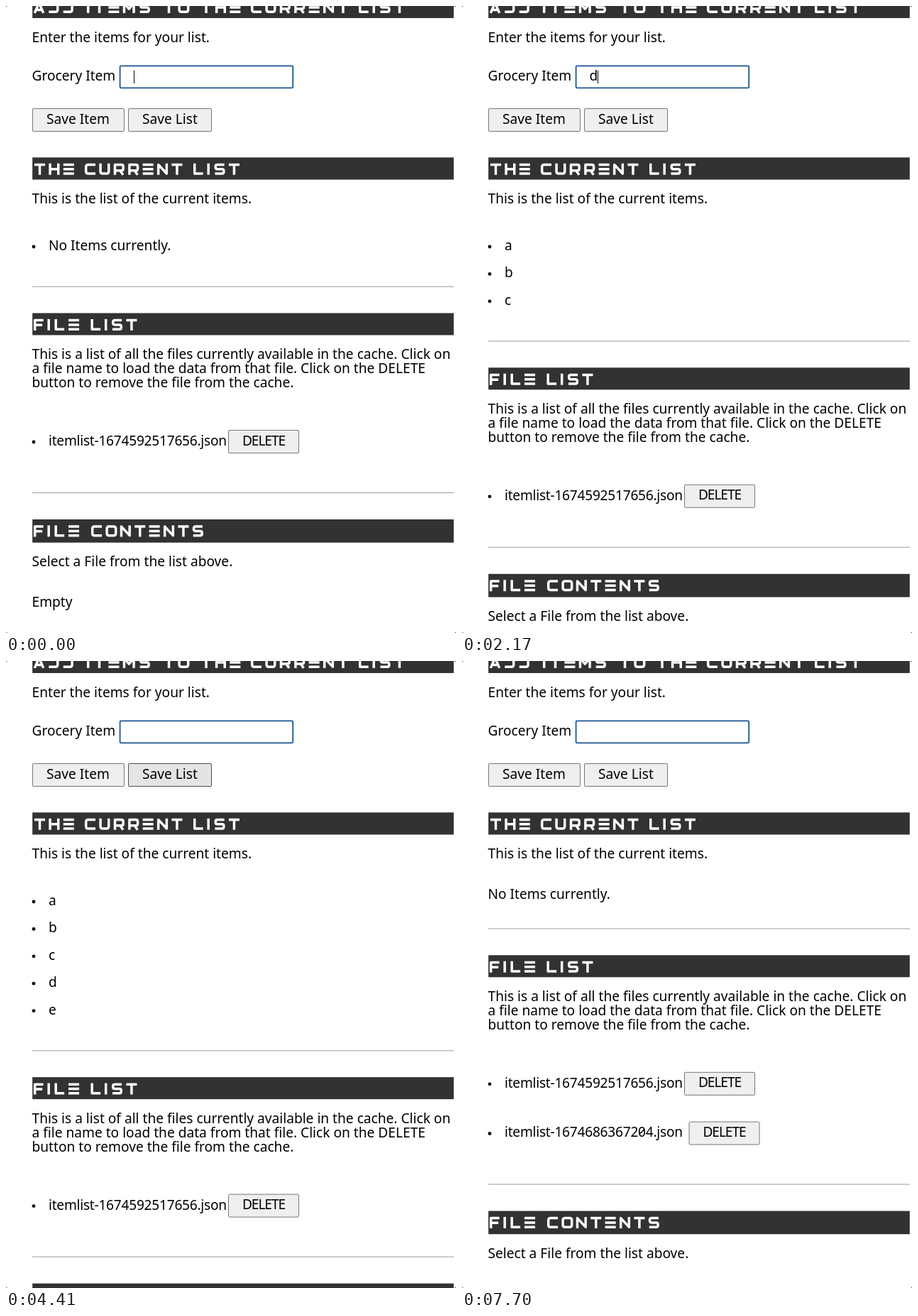
An HTML page for the animation above (8 s loop, 634 by 883 pixels).

```html
<!DOCTYPE html>
<html lang="en">
<head>
<meta charset="utf-8">
<title>Grocery list</title>
<style>
html, body { margin: 0; width: 100%; height: 100%; overflow: hidden; background: #fff; }
svg { display: block; width: 634px; height: 883px; }
text { font: 19.15px "Noto Sans", "Open Sans", sans-serif; fill: #000; white-space: pre; }
.file { letter-spacing: -.25px; font-variant-numeric: slashed-zero; }
.caps { letter-spacing: -1.1px; }
.bar { fill: #323232; }
.lettering { fill: none; stroke: #fff; stroke-width: 3.7; stroke-linejoin: round; }
.rule { fill: #9c9c9c; }
.button { fill: #efefef; stroke: #767676; }
.button.hover { fill: #e4e4e4; stroke: #4f4f4f; }
.button.active { fill: #f5f5f5; stroke: #8d8d8d; }
.input { fill: #fff; stroke: #767676; }
.input.hover { stroke: #4f4f4f; }
.input.focus { stroke: #185592; stroke-width: 1.8; }
</style>
</head>
<body>
<svg id="stage" viewBox="0 0 634 883"></svg>
<script>
const LOOP = 8000, ITEM_STEP = 38.4, FILE_STEP = 69.7, EMPTY_SHIFT = -18.2;
const stage = document.getElementById('stage');

function add(parent, tag, attrs, content) {
  const el = document.createElementNS('http://www.w3.org/2000/svg', tag);
  for (const key in attrs) el.setAttribute(key, attrs[key]);
  if (content) el.textContent = content;
  parent.append(el);
  return el;
}
const group = parent => add(parent, 'g', {});
const label = (parent, x, y, text, cls = '') => add(parent, 'text', { x, y, class: cls }, text);
const box = (parent, x, y, width, height, cls, rx = 0) =>
  add(parent, 'rect', { x, y, width, height, rx, class: cls });
const shift = (el, y) => el.setAttribute('transform', `translate(0 ${y})`);
const show = (el, on) => el.setAttribute('visibility', on ? 'visible' : 'hidden');
const rule = (parent, y) => box(parent, 37, y, 594, 1, 'rule');

// Display lettering: open strokes in a cell 16 wide and 17 high.
const glyphs = {
  A: 'M1.4 17L8 1.8L14.6 17M4 12.4H12',
  C: 'M16 1.8H5Q1.8 1.8 1.8 5V12Q1.8 15.2 5 15.2H16',
  D: 'M1 1.8H11Q14.2 1.8 14.2 5V12Q14.2 15.2 11 15.2H1',
  E: 'M0 1.8H16M0 8.5H16M0 15.2H16',
  F: 'M14.5 1.8H1.8V17M1.8 9H13',
  H: 'M1.8 0V17M14.2 0V17M1.8 8.5H14.2',
  I: 'M1.8 0V17',
  L: 'M1.8 0V15.2H14.5',
  M: 'M1.8 17V1.8L9 11L16.2 1.8V17',
  N: 'M1.8 17V1.8L14.2 15.2V0',
  O: 'M5 1.8H12Q15.2 1.8 15.2 5V12Q15.2 15.2 12 15.2H5Q1.8 15.2 1.8 12V5Q1.8 1.8 5 1.8Z',
  R: 'M1.8 17V1.8H11.5Q14.2 1.8 14.2 4.5V8Q14.2 10.7 11.5 10.7H1.8M9.5 10.7L14 17',
  S: 'M15 1.8H4.5Q1.8 1.8 1.8 4.5V5.8Q1.8 8.5 4.5 8.5H11.5Q14.2 8.5 14.2 11.2V12.5Q14.2 15.2 11.5 15.2H1',
  T: 'M0 1.8H16M8 1.8V17',
  U: 'M1.8 0V12Q1.8 15.2 5 15.2H11Q14.2 15.2 14.2 12V0'
};
const advance = { I: 10, L: 19.5, F: 19.5, M: 23 };

function heading(parent, top, height, words) {
  box(parent, 37.2, top, 593.6, height, 'bar');
  const title = words.map(word => word[0]).join(' ');
  const g = add(parent, 'g', { class: 'lettering', role: 'img', 'aria-label': title });
  for (const [word, start] of words) {
    let x = start;
    for (const ch of word) {
      add(g, 'path', { d: glyphs[ch], transform: `translate(${x} ${top + 8.4}) scale(.94)` });
      x += advance[ch] || 20.4;
    }
  }
}

function button(parent, x, y, width, text, cls) {
  const face = box(parent, x + .5, y + .5, width - 1, 32, 'button', 1.5);
  label(parent, x + 20, y + 21.5, text, cls);
  return face;
}

function bullet(parent, y, text, cls) {
  add(parent, 'circle', { cx: 39, cy: y - 5, r: 2.4 });
  label(parent, 60, y, text, cls);
}

function fileRow(parent, y, name, buttonX) {
  const g = group(parent);
  bullet(g, y, name, 'file');
  button(g, buttonX, y - 22, 100, 'DELETE', 'caps');
  return g;
}

// Entry form
heading(stage, -14.5, 31.5, [['ADD', 39], ['ITEMS', 114], ['TO', 222], ['THE', 274.5], ['CURRENT', 345], ['LIST', 497]]);
label(stage, 36.5, 51, 'Enter the items for your list.');
label(stage, 36.5, 105, 'Grocery Item');
const input = box(stage, 160, 84, 244, 31, 'input', 1.5);
const entry = label(stage, 179.5, 105, '');
const caret = box(stage, 180, 91, 1, 18, '');
button(stage, 37, 144, 130, 'Save Item');
const saveList = button(stage, 172, 144, 118, 'Save List');

// Current list
heading(stage, 213.3, 31.2, [['THE', 40], ['CURRENT', 111], ['LIST', 264]]);
label(stage, 36.5, 278, 'This is the list of the current items.');
const placeholder = group(stage);
bullet(placeholder, 344, 'No Items currently.');
const cleared = label(stage, 36.5, 335, 'No Items currently.');
const items = [...'abcde'].map((name, i) => {
  const g = group(stage);
  bullet(g, 344 + i * ITEM_STEP, name);
  return g;
});

// Cached files
const files = group(stage);
rule(files, 394.7);
heading(files, 432.5, 31, [['FILE', 39], ['LIST', 119.5]]);
label(files, 36.5, 497, 'This is a list of all the files currently available in the cache. Click on');
label(files, 36.5, 517, 'a file name to load the data from that file. Click on the DELETE');
label(files, 36.5, 537, 'button to remove the file from the cache.');
fileRow(files, 619, 'itemlist-1674592517656.json', 313);
const savedFile = fileRow(files, 619 + FILE_STEP, 'itemlist-1674686367204.json', 319.5);

// File contents
const contents = group(files);
rule(contents, 685);
heading(contents, 723, 32.7, [['FILE', 39], ['CONTENTS', 120]]);
label(contents, 36.5, 789, 'Select a File from the list above.');
label(contents, 36.5, 846, 'Empty');

// Rounded window corners
add(stage, 'path', { d: 'M0 0H2L0 2ZM634 0V2L632 0ZM0 883V881L2 883ZM634 883H632L634 881Z', fill: '#777' });

const type = key => ({ entry: key, caret: true });
const save = count => ({ entry: '', caret: true, count });
const on = { caret: true }, off = { caret: false };
const start = { entry: '', caret: true, count: 0, cleared: false, saved: false, input: 'focus', save: '' };
const steps = [
  [70, off], [350, type('a')], [630, save(1)],
  [840, off], [980, type('b')], [1260, save(2)],
  [1470, type('c')], [1820, save(3)],
  [2030, off], [2170, type('d')], [2380, save(4)],
  [2730, type('e')], [3150, save(5)],
  [3290, off], [3780, on], [4060, { save: 'hover' }],
  [4270, off], [4340, { save: '' }], [4410, { save: 'hover' }],
  [4620, { save: 'active', input: '' }],
  [4760, { save: 'hover', count: 0, cleared: true }],
  [4830, { saved: true }],
  [5320, { save: '', input: 'hover' }],
  [6160, { input: 'focus', caret: true }],
  [6650, off], [7210, on], [7700, off]
];

function draw(s) {
  entry.textContent = s.entry;
  const width = s.entry ? entry.getComputedTextLength() - 1 : 0;
  caret.setAttribute('x', 180 + Math.round(width));
  show(caret, s.caret);
  input.setAttribute('class', 'input ' + s.input);
  const edge = s.input === 'focus' ? [160.6, 84.4, 243.6, 31] : [159.5, 83.5, 245, 32.5];
  ['x', 'y', 'width', 'height'].forEach((key, i) => input.setAttribute(key, edge[i]));
  saveList.setAttribute('class', 'button ' + s.save);
  show(placeholder, !s.count && !s.cleared);
  show(cleared, s.cleared);
  items.forEach((item, i) => show(item, i < s.count));
  shift(files, s.cleared ? EMPTY_SHIFT : Math.max(0, s.count - 1) * ITEM_STEP);
  show(savedFile, s.saved);
  shift(contents, s.saved ? FILE_STEP : 0);
}

let drawn = -1;
const begin = performance.now();
function tick() {
  const t = (performance.now() - begin) % LOOP;
  const past = steps.filter(step => step[0] <= t);
  if (past.length !== drawn) {
    drawn = past.length;
    draw(Object.assign({}, start, ...past.map(step => step[1])));
  }
  requestAnimationFrame(tick);
}
tick();
</script>
</body>
</html>
```
